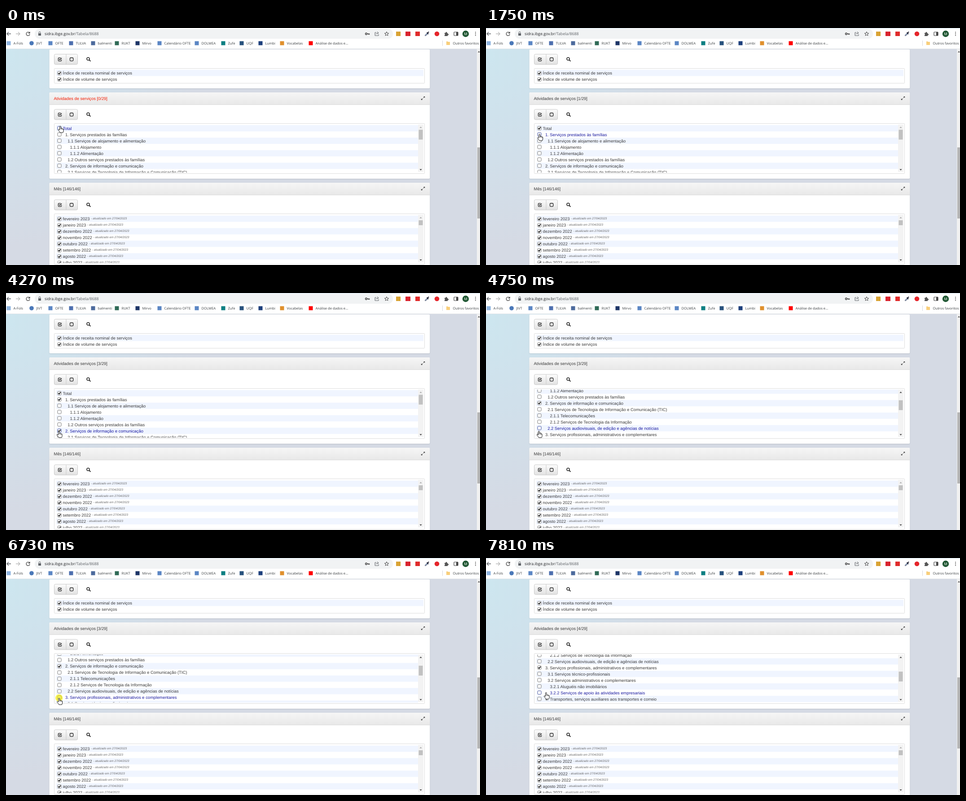
These frames come from a looping animation (1056x530 px, 8 s). An HTML page with a canvas:

```html
<!DOCTYPE html>
<html lang="pt-BR">
<head>
<meta charset="utf-8">
<title>Seleção de atividades</title>
<style>
html, body { margin: 0; width: 100%; height: 100%; overflow: hidden; background: #fff; }
canvas { display: block; width: 1056px; height: 530px; }
</style>
</head>
<body>
<canvas id="stage" width="1056" height="530"></canvas>
<script>
const ctx = document.getElementById('stage').getContext('2d');
const LOOP = 8000, ROW = 14, STEP = 66.5, LIST_TOP = 217.2;
const PAGE = '"Liberation Sans", Arial, sans-serif';
const UI = '"Open Sans", "Noto Sans", sans-serif';
const INK = '#3c3c3c', DARK = '#222', GREY = '#5f6368';

// [indent level, label]
const activities = [
  [0, 'Total'],
  [1, '1. Serviços prestados às famílias'],
  [2, '1.1 Serviços de alojamento e alimentação'],
  [3, '1.1.1 Alojamento'],
  [3, '1.1.2 Alimentação'],
  [2, '1.2 Outros serviços prestados às famílias'],
  [1, '2. Serviços de informação e comunicação'],
  [2, '2.1 Serviços de Tecnologia de Informação e Comunicação (TIC)'],
  [3, '2.1.1 Telecomunicações'],
  [3, '2.1.2 Serviços de Tecnologia da Informação'],
  [2, '2.2 Serviços audiovisuais, de edição e agências de notícias'],
  [1, '3. Serviços profissionais, administrativos e complementares'],
  [2, '3.1 Serviços técnico-profissionais'],
  [2, '3.2 Serviços administrativos e complementares'],
  [3, '3.2.1 Aluguéis não imobiliários'],
  [3, '3.2.2 Serviços de apoio às atividades empresariais'],
  [1, '4. Transportes, serviços auxiliares aos transportes e correio'],
  [2, '4.1 Transporte terrestre']
];
const months = ['fevereiro 2023', 'janeiro 2023', 'dezembro 2022', 'novembro 2022',
  'outubro 2022', 'setembro 2022', 'agosto 2022', 'julho 2022'];

// [icon centre, icon colour, round, label]
const bookmarks = [
  [6, '#8fb4e0', 0, 'A-Fols'], [57, '#4a78b8', 1, 'JIVT'], [99, '#5b86c4', 0, 'OFTE'],
  [145, '#4d6fae', 0, 'TULVA'], [194, '#4c6a9c', 0, 'balmenti'], [247, '#2f6a56', 0, 'RUKT'],
  [293, '#1d3567', 0, 'Mirvo'], [342, '#5b86c4', 0, 'Calendário OFTE'],
  [425, '#5b86c4', 0, 'DOLMEA'], [484, '#0d7f82', 0, 'Zufe'], [525, '#27517c', 0, 'UQF'],
  [567, '#1d3f7c', 0, 'Lumbi'], [615, '#e0902c', 0, 'Vocabelas'],
  [679, '#f00', 0, 'Análise de dados e...']
];

// [press, release, row]
const clicks = [[870, 1070, 0], [2020, 2160, 1], [4000, 4200, 6], [6730, 6860, 11]];

// [time, x, y] of the fingertip
const path = [
  [0, 121, 219], [129, 121, 219], [130, 116, 225], [329, 116, 225], [400, 116, 227],
  [530, 117, 224], [670, 119, 226], [1230, 119, 226], [1480, 120, 230], [1750, 119.5, 237],
  [2500, 119.5, 237], [2760, 121, 255], [3120, 121, 292], [3330, 120, 303], [3500, 113, 306],
  [3800, 118, 308.5], [4900, 118, 308.5], [5100, 119, 243], [5170, 118, 245], [5300, 118, 279],
  [5450, 116, 290], [5710, 119, 289], [5920, 120, 300], [6120, 120, 312], [6400, 118.5, 313],
  [7360, 118.5, 313], [7490, 127, 297], [7559, 127, 297], [7560, 137.5, 303.5],
  [7809, 137.5, 303.5], [7810, 134, 300.5], [8000, 134, 300.5]
];

function cursorAt(t) {
  t = Math.max(0, t);
  let i = 1;
  while (i < path.length - 1 && path[i][0] < t) i++;
  const [t0, x0, y0] = path[i - 1], [t1, x1, y1] = path[i];
  const p = Math.min(1, (t - t0) / (t1 - t0));
  return [x0 + (x1 - x0) * p, y0 + (y1 - y0) * p];
}
function easeOut(t, from, to) {
  const p = Math.min(1, Math.max(0, (t - from) / (to - from)));
  return 1 - (1 - p) ** 2;
}
const scrollAt = t => STEP * (easeOut(t, 4560, 4820) + easeOut(t, 7110, 7340));

function rect(x, y, w, h, color) {
  ctx.fillStyle = color;
  ctx.fillRect(x, y, w, h);
}
function round(x, y, w, h, r, fill, stroke, width = 1) {
  ctx.beginPath();
  ctx.roundRect(x, y, w, h, r);
  if (fill) { ctx.fillStyle = fill; ctx.fill(); }
  if (stroke) { ctx.strokeStyle = stroke; ctx.lineWidth = width; ctx.stroke(); }
}
function circle(x, y, r, fill, stroke, width = 1) {
  ctx.beginPath();
  ctx.arc(x, y, r, 0, 7);
  if (fill) { ctx.fillStyle = fill; ctx.fill(); }
  if (stroke) { ctx.strokeStyle = stroke; ctx.lineWidth = width; ctx.stroke(); }
}
function shape(d, x, y, fill, stroke, width = 1) {
  const p = new Path2D(d);
  ctx.save();
  ctx.translate(x, y);
  if (fill) { ctx.fillStyle = fill; ctx.fill(p); }
  if (stroke) { ctx.strokeStyle = stroke; ctx.lineWidth = width; ctx.stroke(p); }
  ctx.restore();
}
function text(s, x, y, color = INK, font = '9.38px ' + PAGE) {
  ctx.font = font;
  ctx.fillStyle = color;
  ctx.fillText(s, x, Math.round(y));
}
function vertical(y0, y1, from, to) {
  const g = ctx.createLinearGradient(0, y0, 0, y1);
  g.addColorStop(0, from);
  g.addColorStop(1, to);
  return g;
}

function drawBrowser(t) {
  rect(0, 0, 1056, 47, '#fff');
  if (t >= 870) {
    rect(0, 0, 1056, 1, '#cbdde9');
    rect(313, 0, 167, 1, '#d8dfe5');
  }
  shape('M5 0H-4M0-4L-4 0L0 4', 6, 13, null, GREY, 1.3);
  shape('M-5 0H4M0-4L4 0L0 4', 27, 13, null, '#bbb', 1.3);
  shape('M3.4-2.2A4 4 0 1 0 4 1M4-4.6V-1.4H.8', 49, 13, null, '#444', 1.3);
  round(64, 2, 798, 22, 11, '#f1f3f4');
  rect(72, 12, 6, 5, GREY);
  shape('M-1.8 0V-2A1.8 1.8 0 0 1 1.8-2V0', 75, 12, null, GREY, 1);
  const urlFont = '8.8px ' + UI;
  text('sidra.ibge.gov.br', 86, 16, '#202124', urlFont);
  text('/Tabela/8688', 86 + ctx.measureText('sidra.ibge.gov.br').width, 16, GREY, urlFont);

  circle(802.5, 13, 1.9, null, '#444', 1.5);
  shape('M0 0H5V2M3 0V2', 804.5, 13, null, '#444', 1.4);
  shape('M-1-3H-4V4H4V1M-2 1Q-1-2 3-2M1-5L4-2L1 1', 826, 13, null, GREY, 1);
  shape('M0-4.6L1.3-1.5L4.6-1.3L2.1.8L2.9 4L0 2.3L-2.9 4L-2.1.8L-4.6-1.3L-1.3-1.5Z', 848, 13, null, '#444', 1);
  rect(869, 8, 10, 10, '#d9a334');
  rect(890, 8, 11, 10, '#d9232e');
  rect(912, 8, 10, 10, '#e02b2b');
  shape('M-4.5 4.5L-4 2.5L1-2.5L2.8-.7L-2.4 4Z', 938, 13, '#8ba7c9', '#445', .8);
  shape('M-.4-3L3 .6M1-1.5L4-4.5', 938, 13, null, '#223', 2);
  circle(960, 13, 5.3, '#e5252b');
  shape('M-4-2H-1.6A1.6 1.6 0 1 1 1.4-2H3V0A1.6 1.6 0 1 1 3 3V5H-4V2.8A1.5 1.5 0 0 0-4 0Z', 981, 13, '#555');
  round(998, 9, 9, 8, 1, null, '#444', 1.2);
  rect(1003, 9, 4, 8, '#444');
  circle(1024, 13, 7.2, '#1e5631');
  ctx.textAlign = 'center';
  text('M', 1024, 16, '#fff', '8px ' + UI);
  ctx.textAlign = 'left';
  for (const y of [9.5, 13, 16.5]) circle(1046, y, 1, '#444');

  const barFont = '7.65px ' + UI;
  for (const [x, color, isRound, label] of bookmarks) {
    if (isRound) circle(x, 34, 4.8, color);
    else rect(x - 4.5, 29.5, 9, 9, color);
    text(label, x + 10.5, 37, '#3c4043', barFont);
  }
  rect(972, 28, 1, 12, '#d5d8dc');
  shape('M-4-4H-1L0-3H4V4H-4Z', 985, 34, '#f8cf7c');
  text('Outros favoritos', 995.5, 37, '#3c4043', barFont);
  rect(0, 46, 1056, 1, '#e4e6e9');
}

function drawBackdrop() {
  const g = ctx.createRadialGradient(0, 60, 0, 0, 60, 430);
  g.addColorStop(0, '#cde6ef');
  g.addColorStop(.45, '#d0e0eb');
  g.addColorStop(1, '#d5dae4');
  rect(0, 47, 1056, 483, g);
  rect(1049, 47, 7, 483, '#f1f1f1');
  rect(1050, 267, 6, 159, '#b5b5b5');
  shape('M-2.5 1.5L0-1.5L2.5 1.5Z', 1053.5, 53, '#505050');
}

function drawTools(y) {
  round(107.5, y - 11.5, 52, 23, 3, vertical(y - 12, y + 12, '#fdfdfd', '#e1e1e1'), '#c9c9c9');
  rect(133.5, y - 11, 1, 22, '#c9c9c9');
  shape('M3.6 .4V2.6Q3.6 3.8 2.4 3.8H-2.4Q-3.6 3.8-3.6 2.6V-2.2Q-3.6-3.4-2.4-3.4H2', 120, y, null, DARK, 1.2);
  shape('M-1.8-.6L0 1.2L4-3', 120, y, null, DARK, 1.6);
  round(142.5, y - 3.5, 7.2, 7.2, 1.6, null, DARK, 1.3);
  circle(183, y - 1, 3, null, DARK, 1.5);
  shape('M0 0L3.2 3.2', 185.2, y + 1.2, null, DARK, 1.9);
}

function drawPanel(y, h, title, color) {
  ctx.save();
  ctx.shadowColor = 'rgba(0,0,0,.12)';
  ctx.shadowBlur = 2;
  ctx.shadowOffsetY = 1;
  round(96.6, y, 847.6, h, 2, '#fff');
  ctx.restore();
  if (!title) return;
  round(96.6, y, 847.6, 27, [2, 2, 0, 0], vertical(y, y + 27, '#f6f6f6', '#e8e8e8'));
  rect(96.6, y + 27, 847.6, 1, '#dcdcdc');
  text(title, 106.6, y + 17, color);
  const iconY = y + 13;
  shape('M-3.4 3.2L-.7.7M.7-.7L3.4-3.2', 929, iconY, null, '#444', 1.1);
  shape('M1-4H4.2V-.8ZM-1 4H-4.2V.8Z', 929, iconY, '#444');
}

function drawCheck(y, checked, active) {
  round(115, y - 4, 8, 8, 1.5, '#fff', active ? '#3a4a9c' : '#777');
  if (checked) shape('M-2.6-.2L-.7 1.9L2.8-2.3', 119, y, null, '#111', 1.7);
}

function drawRow(y, i, right, label, level, checked, active) {
  if (i % 2 === 0) rect(112, y, right - 112, ROW, '#f0f5ff');
  drawCheck(Math.round(y + 7), checked, active);
  text(label, 126.6 + 5.3 * level, y + 10.4, active ? '#1a1aa0' : INK);
}

function clipTo(y0, y1, draw) {
  ctx.save();
  ctx.beginPath();
  ctx.rect(108, y0, 824, y1 - y0);
  ctx.clip();
  draw();
  ctx.restore();
}

function drawScrollbar(y, thumb, h, upColor) {
  rect(918, y, 12, 106, '#f3f3f3');
  rect(919.5, thumb, 9, h, '#c1c1c1');
  shape('M-2.6 1.4L0-1.4L2.6 1.4Z', 924, y + 6, upColor);
  shape('M-2.6-1.4L0 1.4L2.6-1.4Z', 924, y + 101, '#444');
}

function drawActivities(t, scroll) {
  const done = clicks.filter(c => t >= c[1]).map(c => c[2]);
  const title = `Atividades de serviços [${done.length}/29]`;
  drawPanel(144, 193, title, done.length ? INK : '#f51c00');
  drawTools(193.5);
  round(107.5, 213.5, 825, 112, 1, '#fff', '#ddd');
  const hover = Math.floor((cursorAt(t - 70)[1] + scroll - LIST_TOP) / ROW);
  clipTo(216, 323.5, () => activities.forEach(([level, label], i) => {
    drawRow(LIST_TOP + i * ROW - scroll, i, 918, label, level, done.includes(i), i === hover);
  }));
  drawScrollbar(216, 227.5 + scroll * .2, 22, scroll > 0 ? '#444' : '#aaa');
}

function drawMonths() {
  drawPanel(346, 200, 'Mês [146/146]', INK);
  drawTools(395.5);
  round(107.5, 415.5, 825, 113, 1, '#fff', '#ddd');
  clipTo(418, 525.5, () => months.forEach((label, i) => {
    const y = 419.5 + i * ROW;
    drawRow(y, i, 918, label, 0, true, false);
    const x = 129.4 + ctx.measureText(label).width;
    text('- atualizado em 27/04/2023', x, y + 8.6, '#666', 'italic 6.6px ' + PAGE);
  }));
  drawScrollbar(418, 430, 11, '#aaa');
}

function drawIndexes() {
  drawPanel(48, 87);
  drawTools(70);
  round(107.5, 90.5, 825, 33, 1, '#fff', '#ddd');
  ['Índice de receita nominal de serviços', 'Índice de volume de serviços'].forEach((label, i) => {
    drawRow(93.5 + i * ROW, i, 930, label, 0, true, false);
  });
}

function drawCursor(t) {
  const [x, y] = cursorAt(t);
  if (clicks.some(([down, up]) => t >= down && t < up)) {
    circle(x - .3, y, 8.3, 'rgba(245,235,0,.65)');
  }
  shape('M-1.5 9V1.6Q-1.5.4-.2.4T1.1 1.6V5.6Q2.8 4.6 3.2 6Q5 5 5.3 6.6Q7 6 7 8V11Q7 13 5.8 15H-.4' +
    'Q-1.8 12.5-4.3 9.6Q-5.2 8.2-4 7.7Q-2.8 7.4-1.5 9Z', x, y, '#fff', '#111', 1);
  shape('M1.1 5.6V8M3.2 6V8.2M5.3 6.6V8.4', x, y, null, '#111', .7);
}

function frame(now) {
  const t = now % LOOP;
  ctx.textRendering = 'geometricPrecision';
  drawBackdrop();
  drawIndexes();
  drawActivities(t, scrollAt(t));
  drawMonths();
  drawBrowser(t);
  drawCursor(t);
}

const start = performance.now();
function tick() {
  frame(performance.now() - start);
  requestAnimationFrame(tick);
}
tick();
</script>
</body>
</html>
```
